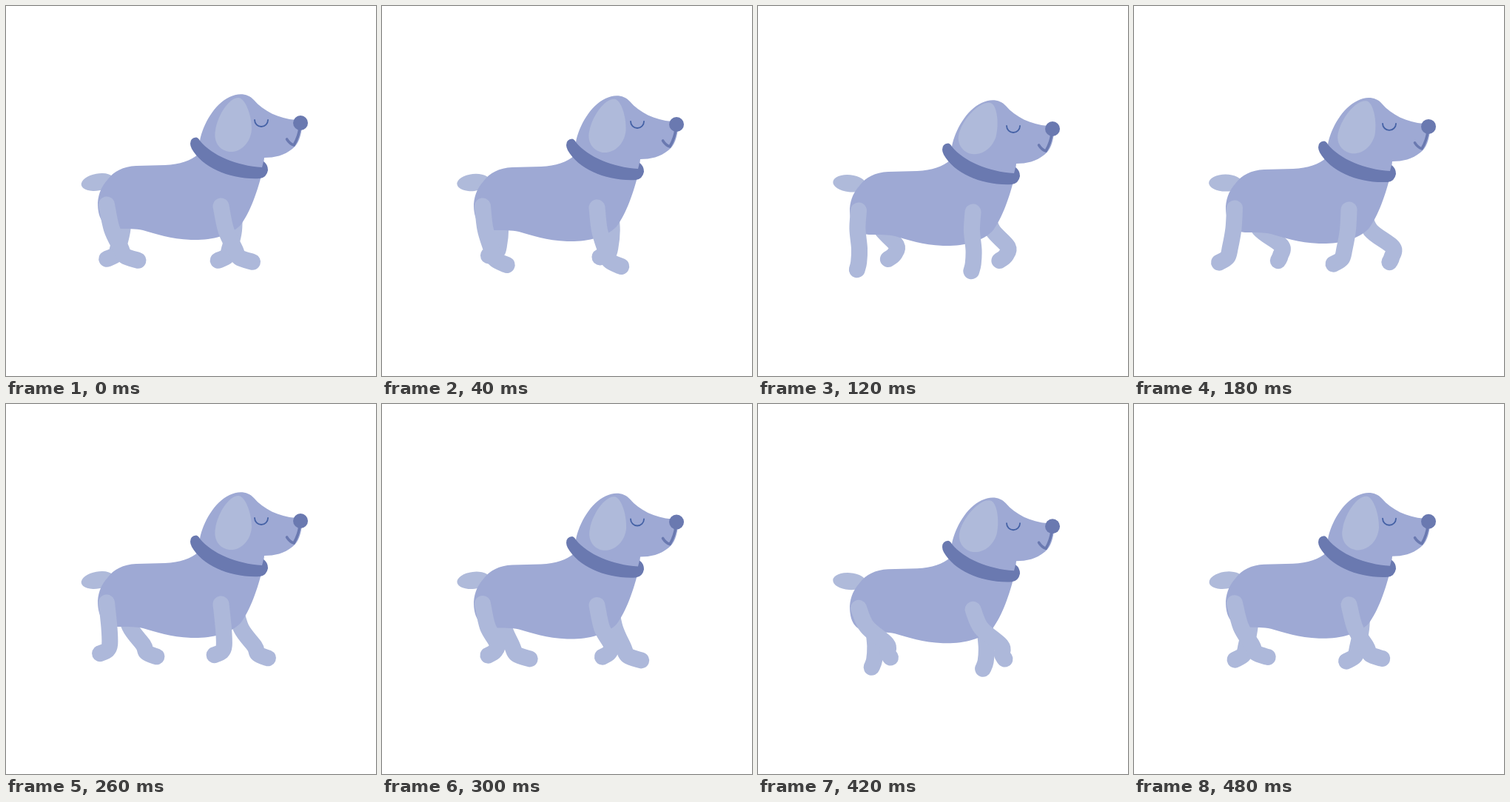
An HTML page that plays this animation: 500 px wide and 500 px high, repeating every 0.5 s.

```html
<!DOCTYPE html>
<html lang="en">
<head>
<meta charset="utf-8">
<title>Walking dog</title>
<style>
  html, body { margin: 0; width: 100%; height: 100%; overflow: hidden; background: #fff; }
  svg { display: block; width: 100%; height: 100%; }
  .leg { fill: none; stroke: #adb8da; stroke-width: 22; stroke-linecap: round; stroke-linejoin: round; }
  .light { fill: #afbada; }
  .coat { fill: #9ea9d4; }
  .dark { fill: #6a79b0; }
  .line { fill: none; stroke-linecap: round; stroke-linejoin: round; }
</style>
</head>
<body>
<svg viewBox="0 0 500 500">
  <g id="tail"><ellipse class="light" cx="124" cy="238" rx="22.5" ry="11.5" transform="rotate(-10 124 238)"/></g>
  <path class="leg" id="farHind"/>
  <path class="leg" id="farFront"/>
  <g id="body">
    <path class="coat" d="M262 182C266 160 282 132 302 123C314 117 327 118 335 127C348 142 368 152 392 154L400 165
      C398 176 396 186 387 193C376 202 363 205 349 205L347 222C340 250 330 279 317 296C303 311 275 317 250 316
      C222 315 203 308 185 303C175 301 165 301 150 301C130 299 124 285 124 266C125 252 130 243 137 235
      C146 223 158 217 176 216L215 215C235 214 250 209 260 200Z"/>
    <path class="dark" d="M249 186Q249 178 257 177.500Q260 178 262 182C278 202 312 216 346 218L348 210Q354 214 354 222
      Q352 232 343 233C304 235 266 219 251 193Q249 189 249 186Z"/>
    <path class="light" id="ear" d="M314 124C323 124 332 147 332 166C331 184 318 198 302 197C288 195 280 183 283 168C286 148 301 124 314 124Z"/>
    <path class="line" stroke="#4461a5" stroke-width="1.8" d="M336 154A9 9 0 0 0 354 154"/>
    <path class="line" stroke="#6a79b0" stroke-width="3.6" d="M397 164C396 174 393 181 389 188C386 187 382 184 379.500 180"/>
    <circle class="dark" cx="398" cy="158" r="10"/>
  </g>
  <path class="leg" id="nearHind"/>
  <path class="leg" id="nearFront"/>
</svg>
<script>
const LOOP = 500, STEP = 20;
const FAR_DELAY = 295, FAR_SHIFT = 22;

const $ = id => document.getElementById(id);
const mix = (a, b, u) => a + (b - a) * u;

// Mean plus first and second harmonics of the stride.
function wave(t, mean, c1, s1, c2 = 0, s2 = 0) {
  const w = 2 * Math.PI * t / LOOP;
  return mean + c1 * Math.cos(w) + s1 * Math.sin(w) + c2 * Math.cos(2 * w) + s2 * Math.sin(2 * w);
}

// Joints of a hind leg; the heel rounds off the turn from ankle to paw.
function stride(t, bob) {
  const hip = [136, 268.5 + bob];
  const knee = [wave(t, 140.7, 2.1, -6.4), 301];
  const ankle = [wave(t, 151.2, 8.8, -20.1, -5.2, 1.2), wave(t, 325.5, 1, 2)];
  const paw = [wave(t, 151, 27.5, -19.4, 0, 3.5), wave(t, 345.3, 3.3, 5.7, -4.8, 1.9)];
  const heel = [mix(ankle[0], paw[0], 0.25), mix(ankle[1], paw[1], 0.65)];
  return [hip, knee, ankle, heel, paw];
}

// Smooth curve through the joints.
function limb(joints, dx, dy) {
  const pts = joints.map(([x, y]) => [x + dx, y + dy]);
  let d = "M" + pts[0];
  for (let i = 0; i < pts.length - 1; i++) {
    const a = pts[i], b = pts[i + 1], before = pts[i - 1] || a, after = pts[i + 2] || b;
    const c1 = a.map((v, k) => v + (b[k] - before[k]) / 6);
    const c2 = b.map((v, k) => v - (after[k] - a[k]) / 6);
    d += "C" + [c1, c2, b].join(" ");
  }
  return d;
}

// Two dips per loop, easing between the high and low points.
function dip(t) {
  const marks = [0, 120, 260, 400, LOOP];
  let i = 3;
  while (marks[i] > t) i--;
  const u = (t - marks[i]) / (marks[i + 1] - marks[i]);
  const e = (1 - Math.cos(Math.PI * u)) / 2;
  return 8 * (i % 2 ? 1 - e : e);
}

function draw(t) {
  const y = dip(t);
  const near = stride(t, y), far = stride(t - FAR_DELAY, y);
  $("body").setAttribute("transform", `translate(0 ${y})`);
  $("tail").setAttribute("transform", `translate(0 ${y}) rotate(${2 * y} 146 234)`);
  $("ear").setAttribute("transform", `rotate(${1.7 * y} 318 124)`);
  $("nearHind").setAttribute("d", limb(near, 0, 0));
  $("nearFront").setAttribute("d", limb(near, 154.5, 2));
  $("farHind").setAttribute("d", limb(far, FAR_SHIFT, 0));
  $("farFront").setAttribute("d", limb(far, FAR_SHIFT + 150.5, 2));
}

const start = performance.now();
function tick() {
  const t = Math.max(0, performance.now() - start) % LOOP;
  draw(Math.floor(t / STEP) * STEP);
  requestAnimationFrame(tick);
}
draw(0);
requestAnimationFrame(tick);
</script>
</body>
</html>
```
